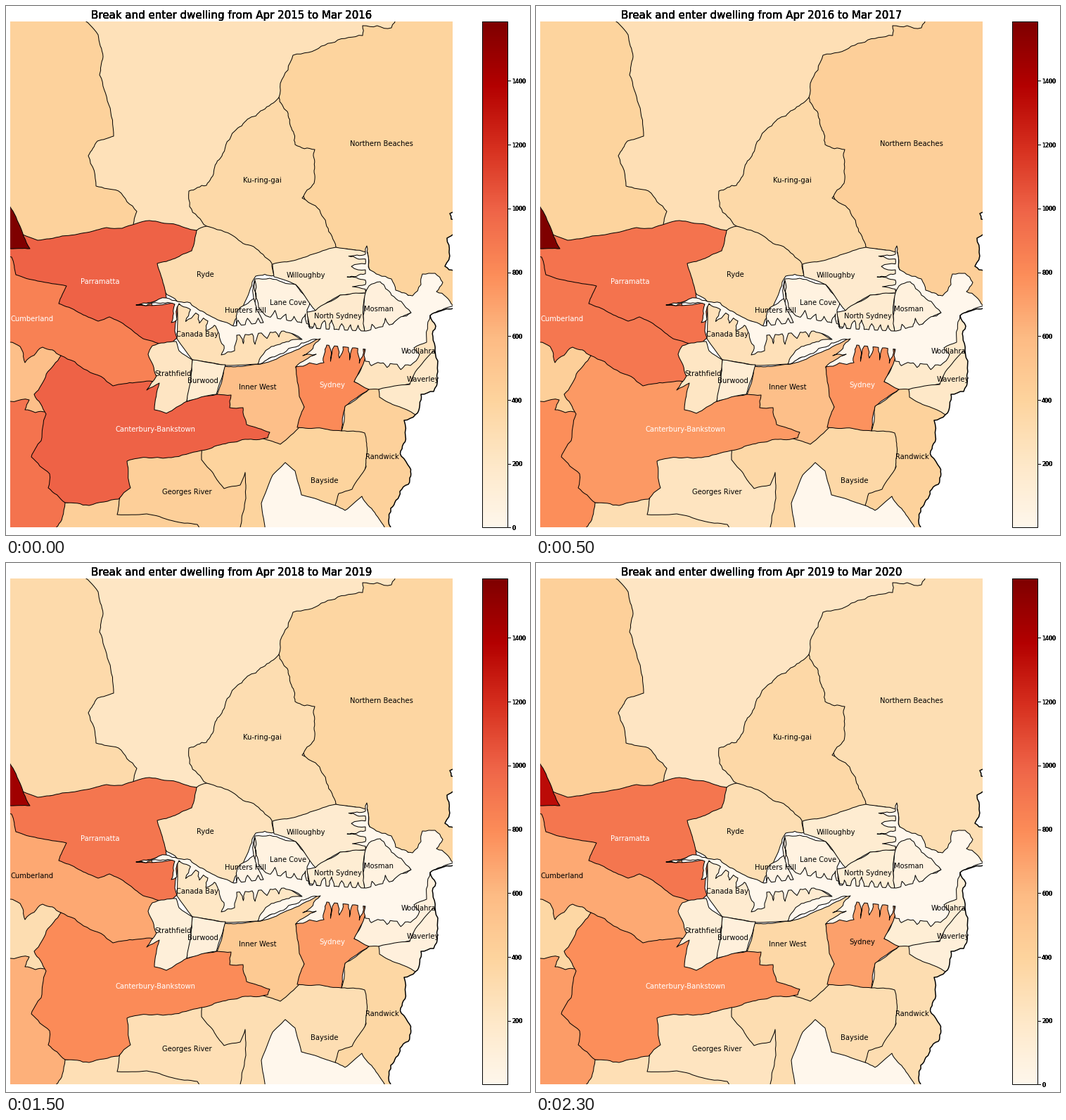
Animation, 745 px wide and 752 px high, one loop 2500 ms. Source, as a matplotlib script:

```python
import numpy as np
import matplotlib.pyplot as plt
from matplotlib.animation import FuncAnimation
from matplotlib.patches import Polygon, Rectangle

W, H, DPI = 745, 752, 64
PT = 72 / DPI                      # points per pixel
LOW, HIGH = 1, 1586
WHITE_FROM = 725                   # counts above this get a white label
YEARS = 5

plt.rcParams["font.family"] = "DejaVu Sans"
cmap = plt.get_cmap("OrRd")
rng = np.random.default_rng(11)

fig = plt.figure(figsize=(W / DPI, H / DPI), dpi=DPI, facecolor="white")
ax = fig.add_axes([0, 0, 1, 1])
ax.axis("off")
frame = Rectangle((6, 22), 629, 719, fc="none", ec="none")
ax.add_patch(frame)
regions = []


def shade(count):
    return cmap((count - LOW) / (HIGH - LOW))


def left_of(a, b):
    """Vector a to b turned by a quarter."""
    return np.array([b[1] - a[1], a[0] - b[0]])


def fractal(a, b, wild):
    """Midpoint displacement from a up to, but not including, b."""
    size = np.hypot(*(b - a))
    if size < 6:
        return [a]
    shift = rng.uniform(-1, 1) * min(3, wild * size) / size
    mid = (a + b) / 2 + left_of(a, b) * shift
    return fractal(a, mid, wild) + fractal(mid, b, wild)


def outline(corners, wild):
    pts = np.array(corners, float)
    return [p for a, b in zip(pts, np.roll(pts, -1, axis=0))
            for p in fractal(a, b, wild)]


def inlets(a, b, n, depth):
    """Shore from a to b, cut by n narrow bays on its land side."""
    a, b = np.array(a, float), np.array(b, float)
    side = left_of(a, b) / np.hypot(*(b - a))
    pts = [a]
    for k in range(n):
        for part, reach in ((0.25, 0), (0.5, depth * rng.uniform(0.6, 1.3)), (0.8, 0)):
            slide = rng.uniform(-0.12, 0.12)
            pts.append(a + (b - a) * (k + part + slide) / n + side * reach)
    return pts + [b]


def text(x, y, s, size, **kw):
    return ax.text(x, y, s, fontsize=size * PT, **kw)


def area(corners, wild, color="white", width=1):
    patch = ax.add_patch(Polygon(outline(corners, wild), fc=color, ec="black",
                                 lw=width * PT, joinstyle="round"))
    patch.set_clip_path(frame)
    return patch


def region(counts, corners, wild=0.07, label=None, at=(0, 0)):
    """Counts are spread evenly over the years. Later regions cover earlier
    ones, so hidden sides stay loose."""
    yearly = np.interp(np.linspace(0, 1, YEARS), np.linspace(0, 1, len(counts)), counts)
    name = label and text(at[0], at[1] + 4, label, 10, ha="center", zorder=5)
    regions.append((area(corners, wild), name, yearly))


# Hornsby, The Hills, Botany Bay, Sutherland
region([270, 290, 280, 220, 230],
       [(-10, 0), (580, 0), (580, 60), (450, 325), (-10, 325)], 0)
region([410, 400, 350, 340, 430],
       [(106, 15), (131, 41), (138, 72), (133, 98), (146, 140), (153, 185), (130, 192),
        (117, 213), (128, 256), (160, 263), (186, 292), (182, 306), (182, 320),
        (20, 340), (-10, 340), (-10, 15)])
area([(350, 640), (520, 640), (540, 745), (350, 755)], 0, shade(LOW))
region([440, 300, 390, 290, 290], [(62, 690), (300, 690), (300, 760), (62, 760)], 0)

# north
region([400, 440, 430, 380, 300],
       [(556, 15), (548, 31), (507, 28), (507, 42), (430, 66), (408, 70), (390, 110),
        (388, 130), (395, 200), (440, 335), (469, 343), (512, 350), (520, 400),
        (600, 420), (650, 432), (650, 15)], 0.12, "Northern Beaches", (534, 195))
region([350, 350, 340, 310, 360],
       [(388, 130), (400, 150), (411, 197), (439, 204), (438, 252), (421, 273),
        (440, 284), (469, 343), (440, 358), (382, 372), (330, 360), (285, 313),
        (261, 285), (260, 263), (285, 255), (308, 210), (325, 178), (365, 148)],
       0.12, "Ku-ring-gai", (364, 247))
region([850, 900, 830, 680, 670],
       [(-10, 340), (200, 410), (235, 478), (230, 545), (152, 541), (60, 520),
        (-10, 500)], 0, "Cumberland", (37, 444))
region([310, 340, 370, 260, 300],
       [(271, 319), (285, 313), (325, 328), (352, 342), (378, 366), (381, 383),
        (355, 384), (340, 420), (322, 456), (262, 435), (210, 395), (208, 370),
        (250, 340)], 0.1, "Ryde", (283, 381))
region([40], [(328, 434), (354, 415), (380, 452), (330, 462)], 0.1,
       "Hunters Hill", (340, 432))
region([70], [(354, 388), (375, 387), (412, 396), (433, 420), (428, 432), (432, 456),
              (372, 452), (352, 415)], 0.08, "Lane Cove", (401, 421))
region([180, 150], [(379, 367), (432, 354), (469, 343), (514, 350), (514, 408),
                    (475, 411), (440, 433), (412, 396), (381, 385)], 0.04,
       "Willoughby", (426, 382))
region([170, 130], [(440, 433), (475, 411), (511, 408), (508, 440), (510, 463),
                    (432, 456), (428, 435)], 0.06, "North Sydney", (472, 440))
region([90, 70], [(511, 408), (514, 394), (532, 389), (550, 409), (564, 418),
                  (576, 436), (550, 452), (510, 463), (508, 440)], 0.06,
       "Mosman", (530, 430))
region([1000, 920, 910, 910, 910],
       [(24, 325), (45, 333), (115, 322), (143, 315), (165, 316), (204, 305),
        (271, 319), (264, 348), (215, 366), (228, 415), (185, 425), (245, 421),
        (240, 462), (243, 472), (230, 483), (195, 473), (147, 442), (131, 448),
        (75, 423), (86, 398), (45, 391), (14, 382), (8, 357), (-10, 352), (-10, 340)],
       0.04, "Parramatta", (134, 391))
region([1585, 1585, 1500, 1460, 1340],
       [(0, 275), (18, 309), (34, 345), (6, 345), (-10, 345)], 0.04)

# Fairfield, Liverpool
region([560, 440, 530, 310, 370],
       [(-10, 472), (20, 484), (27, 507), (52, 485), (78, 497), (110, 525), (100, 590),
        (-10, 600)], 0.1)
region([920, 790, 780, 640, 730],
       [(-10, 562), (33, 560), (27, 574), (57, 577), (100, 590), (100, 700), (84, 706),
        (80, 727), (66, 750), (-10, 750)], 0.1)

# south
region([400, 360, 320, 300, 310],
       [(270, 640), (285, 620), (400, 600), (478, 595), (520, 610), (505, 680),
        (468, 710), (420, 695), (411, 661), (397, 649), (379, 667), (363, 707),
        (369, 750), (320, 750), (300, 690)], 0.02, "Bayside", (453, 674))
region([420, 410, 330, 370, 310],
       [(477, 604), (482, 568), (530, 535), (620, 560), (570, 750), (540, 745),
        (506, 697), (482, 717), (468, 710), (473, 693), (492, 687), (512, 655),
        (510, 607)], 0.06, "Randwick", (535, 640))
region([440, 240, 240, 290, 240],
       [(160, 640), (277, 615), (278, 645), (310, 686), (333, 681), (340, 663),
        (341, 700), (331, 750), (279, 750), (272, 737), (200, 722), (158, 723),
        (162, 698)], 0.04, "Georges River", (257, 690))
region([560, 560, 440, 480, 360],
       [(310, 512), (362, 509), (447, 470), (450, 505), (412, 513), (424, 570),
        (419, 597), (390, 623), (360, 613), (330, 600), (299, 560)], 0.04,
       "Inner West", (358, 541))
region([810, 770, 700, 740, 710],
       [(412, 513), (417, 555), (424, 570), (414, 599), (477, 604), (482, 569),
        (516, 545), (495, 534), (512, 505), (508, 482), (457, 478), (440, 503)],
       0.04, "Sydney", (464, 538))
region([1000, 740, 820, 800, 790],
       [(78, 497), (152, 540), (216, 535), (258, 562), (300, 552), (320, 553),
        (318, 571), (337, 571), (342, 595), (375, 606), (372, 614), (340, 616),
        (277, 632), (235, 642), (172, 647), (177, 685), (160, 701), (118, 710),
        (84, 706), (60, 685), (62, 665), (36, 641), (50, 618), (57, 580), (40, 552)],
       0.07, "Canterbury-Bankstown", (213, 601))

# inner south and east
region([280, 270, 160],
       [(244, 424), (262, 426), (287, 442), (306, 454), (395, 458), (421, 475),
        (360, 509), (312, 511), (265, 503), (243, 473)], 0.01, "Canada Bay", (272, 466))
region([230, 220, 180, 110, 120],
       [(208, 483), (242, 477), (246, 490), (265, 503), (257, 562), (228, 579),
        (211, 574), (218, 536), (200, 546), (214, 526), (202, 495)], 0.06,
       "Strathfield", (238, 522))
region([150, 90], [(265, 503), (312, 510), (299, 552), (257, 562)], 0.03,
       "Burwood", (280, 532))
region([240, 180, 130, 90, 130],
       [(511, 500), (604, 436), (625, 455), (620, 500), (574, 537), (530, 545),
        (516, 545), (495, 534)], 0.04, "Woollahra", (587, 490))
region([190, 200, 110, 90, 110],
       [(530, 545), (574, 538), (582, 520), (608, 490), (625, 540), (600, 585),
        (582, 581), (531, 556)], 0.04, "Waverley", (593, 530))

# harbour, along its north bank and back along the south bank
area([(185, 425), (228, 415), (262, 422), (285, 438), (318, 452),
      *inlets((324, 455), (366, 450), 3, 7),
      (356, 428), (354, 390), (359, 428),
      *inlets((374, 442), (430, 452), 4, 11),
      *inlets((432, 458), (508, 462), 6, 12),
      *inlets((512, 462), (550, 452), 2, 10),
      (576, 436), (562, 420), (548, 411), (532, 392), (516, 398),
      *inlets((511, 406), (511, 350), 4, 22),
      (513, 341), (517, 375), (530, 382), (548, 388), (554, 404), (578, 412),
      (590, 396), (592, 381), (610, 380), (621, 393), (612, 406), (636, 426),
      (603, 440), (598, 478), (580, 486), (588, 495),
      *inlets((575, 511), (511, 505), 3, 8),
      *inlets((511, 488), (456, 482), 4, 22),
      (452, 507), (412, 513), (441, 495), (422, 497), (447, 473),
      (420, 479), (385, 497), (358, 509), (372, 488), (421, 474),
      *inlets((395, 462), (328, 468), 4, 12),
      (325, 490), (306, 496), (310, 483), (303, 466),
      *inlets((298, 455), (260, 430), 3, 14),
      (246, 423), (243, 446), (235, 450), (240, 424)], 0.12, shade(LOW))

# ocean with its heavy shoreline
area([(650, 420), (603, 440), (611, 455), (607, 470), (610, 490), (613, 530),
      (608, 548), (590, 552), (582, 581), (566, 589), (568, 612), (562, 640),
      (574, 656), (572, 680), (560, 690), (547, 714), (545, 750), (650, 750)],
     0.15, width=1.5)
area([(650, 291), (631, 295), (633, 303), (650, 306)], 0.1, width=1.5)
area([(650, 321), (627, 330), (630, 350), (624, 370), (650, 385)], 0.15, width=1.5)

# colour bar; repeated labels give the heavy lettering
ax.imshow(np.linspace(1, 0, 256)[:, None], cmap=cmap, aspect="auto",
          extent=(677, 713, 741, 22), interpolation="nearest")
ax.add_patch(Rectangle((677, 22), 36, 719, fc="none", ec="black", lw=PT))
for count in range(0, 1401, 200):
    y = 741 - (count - LOW) * 719 / (HIGH - LOW)
    tick = ax.plot([713.5, 717], [y, y], color="black", lw=PT)
    tick += [text(719, y, str(count), 8, va="center_baseline") for _ in range(5)]
    if count == 0:
        zero_tick = tick
titles = [text(320.5, 18, "", 15, ha="center") for _ in range(5)]

ax.set_xlim(0, W)
ax.set_ylim(H, 0)


def update(i):
    for patch, name, counts in regions:
        patch.set_facecolor(shade(counts[i]))
        if name:
            name.set_color("white" if counts[i] > WHITE_FROM else "black")
    for t in titles:
        t.set_text(f"Break and enter dwelling from Apr {2015 + i} to Mar {2016 + i}")
    for part in zero_tick:
        part.set_visible(i in (0, YEARS - 1))
    return []


anim = FuncAnimation(fig, update, frames=YEARS, interval=500, repeat=True,
                     repeat_delay=0, init_func=lambda: update(0))
plt.show()
```
